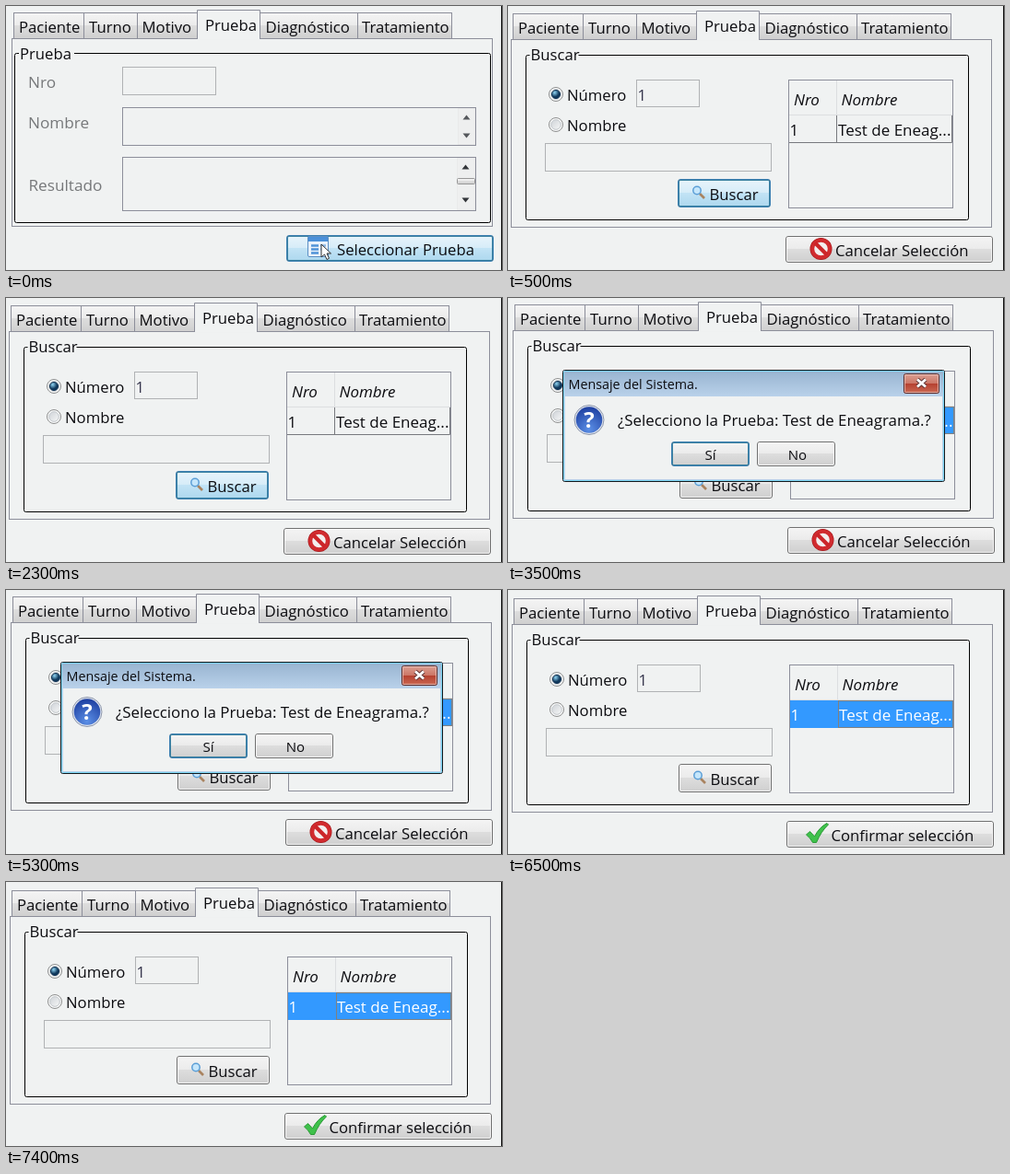
Write an HTML page that moves like this. It is 538 px wide and 287 px high and loops after 8 s.

```html
<!DOCTYPE html>
<html lang="es">
<head>
<meta charset="utf-8">
<title>Selección de prueba</title>
<style>
  html, body { margin: 0; width: 100%; height: 100%; overflow: hidden; background: #f0f2f2; }
  svg { display: block; font: 16.7px "Open Sans", "Noto Sans", sans-serif; }
  text { white-space: pre; }
</style>
</head>
<body>
<svg id="stage" width="538" height="287" viewBox="0 0 538 287">
  <defs>
    <linearGradient id="plain" x2="0" y2="1">
      <stop offset="0" stop-color="#f4f4f4"/><stop offset=".49" stop-color="#ebebeb"/>
      <stop offset=".5" stop-color="#dddddd"/><stop offset="1" stop-color="#cfcfcf"/>
    </linearGradient>
    <linearGradient id="hot" x2="0" y2="1">
      <stop offset="0" stop-color="#e8f4fb"/><stop offset=".49" stop-color="#d6ecf8"/>
      <stop offset=".5" stop-color="#c2e3f5"/><stop offset="1" stop-color="#acd7ee"/>
    </linearGradient>
    <linearGradient id="bar" x2="0" y2="1">
      <stop offset="0" stop-color="#98b4d0"/><stop offset="1" stop-color="#b9d1ea"/>
    </linearGradient>
    <linearGradient id="close" x2="0" y2="1">
      <stop offset="0" stop-color="#dca093"/><stop offset=".48" stop-color="#cc7767"/>
      <stop offset=".5" stop-color="#b5402f"/><stop offset="1" stop-color="#cb6a54"/>
    </linearGradient>
    <radialGradient id="dot" cx=".35" cy=".3">
      <stop offset="0" stop-color="#8fd4f2"/><stop offset="1" stop-color="#10385c"/>
    </radialGradient>
    <linearGradient id="well" x2="1" y2="1">
      <stop offset="0" stop-color="#cfd3d8"/><stop offset="1" stop-color="#f6f7f7"/>
    </linearGradient>
    <radialGradient id="ball" cx=".5" cy=".85" r=".9">
      <stop offset="0" stop-color="#5b8fe6"/><stop offset="1" stop-color="#1a3a9c"/>
    </radialGradient>
  </defs>
</svg>
<script>
const BG = '#f0f2f2', INK = '#0c0c10', GREY = '#76787a', EDGE = '#8c8e9a', PALE = '#dcdee0';
const LOOP = 8000;
const DOTTED = 'stroke-dasharray="1 1"';

// Rectangles cover pixels x..r and y..b inclusive.
const box = (x, y, r, b, fill, stroke, extra = '') =>
  `<rect x="${x + .5}" y="${y + .5}" width="${r - x}" height="${b - y}" fill="${fill}" stroke="${stroke}" ${extra}/>`;
const path = (d, stroke, width = 1, fill = 'none') =>
  `<path d="${d}" fill="${fill}" stroke="${stroke}" stroke-width="${width}"/>`;
const disc = (x, y, r, fill, stroke = 'none', width = 1) =>
  `<circle cx="${x}" cy="${y}" r="${r}" fill="${fill}" stroke="${stroke}" stroke-width="${width}"/>`;
const label = (s, x, y, fill = INK, extra = '') =>
  `<text x="${x}" y="${y}" fill="${fill}" ${extra}>${s}</text>`;

function button(x, y, r, b, hot, focus = hot) {
  return box(x, y, r, b, `url(#${hot ? 'hot' : 'plain'})`, focus ? '#3c7fb1' : '#707070', 'rx="2.5"') +
    box(x + 1, y + 1, r - 1, b - 1, 'none', focus ? '#48c4f0' : '#fafafa', 'rx="1.5" stroke-opacity=".85"') +
    (focus ? box(x + 1, y + 1, r - 1, b - 1, 'none', '#1d3a50', DOTTED) : '');
}

function tabs() {
  const names = ['Paciente', 'Turno', 'Motivo', 'Prueba', 'Diagnóstico', 'Tratamiento'];
  const edges = [8, 84, 142, 207, 275, 381, 483];
  const inset = [6, 6, 5.5, 9, 6.5, 5];
  let out = box(6, 35, 527, 239, BG, EDGE);
  names.forEach((name, i) => {
    const x = edges[i], r = edges[i + 1];
    out += i === 3
      ? box(x, 4, r, 36, BG, 'none') + path(`M${x + .5} 36V4.5H${r + .5}V36`, EDGE)
      : box(x, 7, r, 35, 'url(#plain)', EDGE);
    out += label(name, x + inset[i], i === 3 ? 27 : 28.5);
  });
  return out;
}

function group(title, x, y, r, b, tx, tw) {
  return box(x, y, r, b, 'none', '#000', 'rx="2"') +
    `<rect x="${tx - 2}" y="${y - 2}" width="${tw + 3}" height="5" fill="${BG}"/>` +
    label(title, tx - 1, 58);
}

function arrows(x, top, bottom, color) {
  return path(`M${x - 4} ${top + 2.5}h8l-4-5zM${x - 4} ${bottom - 2.5}h8l-4 5z`, 'none', 0, color);
}

function details() {
  return group('Prueba', 9, 51, 525, 235, 16, 57) +
    `<g font-size="17.2">${label('Nro', 24, 89, GREY)}${label('Nombre', 24, 133, GREY)}${label('Resultado', 24.5, 201, GREY)}</g>` +
    box(126, 66, 227, 96, BG, '#b0b2b4') +
    box(126, 110, 509, 151, BG, EDGE) + box(126, 164, 509, 222, BG, EDGE) +
    box(490, 111, 508, 150, '#eeefef', '#e9eaea') + box(489, 165, 508, 221, '#eeefef', '#e9eaea') +
    arrows(499.5, 121, 141, '#55585c') + arrows(498.5, 175, 211, '#33363a') +
    box(489, 187, 508, 193, 'url(#plain)', '#979797', 'rx="1"');
}

function radio(x, y, on) {
  return disc(x, y, 7.5, '#f8f9f9', '#8e8f8f') + disc(x, y, 5.3, 'url(#well)', '#c3c8cc') +
    (on ? disc(x, y, 4.6, 'url(#dot)', '#17395a') : '');
}

function table(chosen) {
  const ink = chosen ? '#fff' : INK;
  return box(307, 79, 485, 218, BG, EDGE) +
    path('M308 117.5H485M359.5 80V117', PALE) +
    `<g font-size="17">` +
    `<g font-style="italic">${label('Nro', 313, 106.5)}${label('Nombre', 364.5, 106.5)}</g>` +
    (chosen
      ? '<rect x="308" y="118" width="177" height="30" fill="#3399ff"/>' + box(360, 118, 484, 147, 'none', '#cc6600', DOTTED)
      : path('M308 147.5H484.5V118M359.5 118V147', '#77797e')) +
    label('1', 308.5, 140, ink) + label('Test de Eneag...', 361, 140, ink) + '</g>';
}

function search(chosen) {
  return group('Buscar', 22, 52, 502, 231, 28.5, 50) +
    radio(55, 95, true) + radio(55, 128, false) +
    label('Número', 67, 102) + label('Nombre', 67, 135) +
    box(142, 79, 210, 108, BG, '#b0b2b4') + label('1', 143.5, 102, '#33334a') +
    box(43, 148, 288, 178, BG, '#b0b2b4') +
    button(187, 187, 287, 217, !chosen) +
    path('M211 203l5 5', '#a9835f', 2.6) + disc(208, 199.5, 4.2, '#c5e6fb', '#5b9ed6', 1.5) +
    label('Buscar', 221.5, 210) + table(chosen);
}

function windowIcon() {
  return box(327, 250, 349, 272, '#e9f2fb', '#5d8fc4', 'rx="1.5"') +
    '<path d="M328 251h21v5h-21z" fill="#4a90d9"/>' +
    path('M331 260.5h8M331 264.5h8M331 268.5h8', '#4f93d8', 2.5) +
    path('M341 260.5h6M341 264.5h6', '#8ab8e6', 2.5) +
    path('M342 259v14l3.5-3 2.5 5.5 2.5-1.2-2.5-5.3h4.5z', '#333', 1, '#fff');
}

const select = () => button(304, 249, 528, 277, true) + windowIcon() + label('Seleccionar Prueba', 359, 271);

const cancel = () => button(304, 249, 528, 277, false) +
  disc(342.5, 263, 12, '#a8181c') + disc(342.5, 263, 9.3, '#f3eeee', '#d12b2f', 4) +
  path('M336 256.5l13 13', '#cc2529', 4.2) + label('Cancelar Selección', 358, 271);

const confirm = () => button(304, 249, 528, 277, false) +
  path('M325.5 264l4-3.5 5 5.5q5-10 13.5-14.5l1.5 1.5q-8 7.5-13 19.5h-4q-2.5-5-7-8.5z', '#2a9a35', 1, '#3fc14b') +
  label('Confirmar selección', 352.5, 271);

function dialog() {
  const cross = 'M444 88.5l9 8M453 88.5l-9 8';
  return box(59, 78, 473, 199, '#b9d1ea', '#15181c', 'rx="2"') +
    '<rect x="60" y="79" width="413" height="28" fill="url(#bar)"/>' +
    box(60, 79, 472, 198, 'none', '#6fd8f4', 'rx="1" stroke-opacity=".8"') +
    `<rect x="62" y="107" width="409" height="90" fill="${BG}"/>` +
    label('Mensaje del Sistema.', 65.5, 99, INK, 'font-size="14.3"') +
    box(429, 82, 467, 103, 'url(#close)', '#5c2a28', 'rx="2"') +
    box(430, 83, 466, 102, 'none', '#f0cfc8', 'rx="1" stroke-opacity=".7"') +
    path(cross, '#5d3434', 4.6) + path(cross, '#fff', 2.8) +
    disc(88, 132.5, 16, '#dfe4ed', '#8d97ac') + disc(88, 132.5, 14.3, 'url(#ball)') +
    label('?', 88, 141, '#fff', 'font-size="24" font-weight="700" text-anchor="middle"') +
    label('¿Selecciono la Prueba: Test de Eneagrama.?', 119, 139, INK, 'font-size="16.9"') +
    button(177, 156, 261, 182, false, true) + button(270, 156, 354, 182, false) +
    `<g font-size="15" text-anchor="middle">${label('Sí', 219.5, 176)}${label('No', 314, 176)}</g>`;
}

// Each scene: start, end, window shift, content, overlay.
const scenes = [
  [0, 500, 0, 0, () => details() + select()],
  [500, 3500, -3, 1, () => search(false) + cancel()],
  [3500, 6500, -1, 0, () => search(true) + cancel(), dialog],
  [6500, LOOP, -2, 2, () => search(true) + confirm()],
];

const stage = document.getElementById('stage');
stage.insertAdjacentHTML('beforeend',
  `<rect width="538" height="287" fill="${BG}"/>` +
  scenes.map(([, , dx, dy, body, over]) =>
    `<g class="scene"><g transform="translate(${dx} ${dy})">${tabs()}${body()}</g>${over ? over() : ''}</g>`).join('') +
  '<path d="M537.5 0V287" stroke="#111"/>');

const nodes = [...stage.querySelectorAll('.scene')];
function tick() {
  const t = performance.now() % LOOP;
  nodes.forEach((node, i) => {
    const on = t >= scenes[i][0] && t < scenes[i][1];
    node.style.display = on ? '' : 'none';
  });
  requestAnimationFrame(tick);
}
tick();
</script>
</body>
</html>
```
